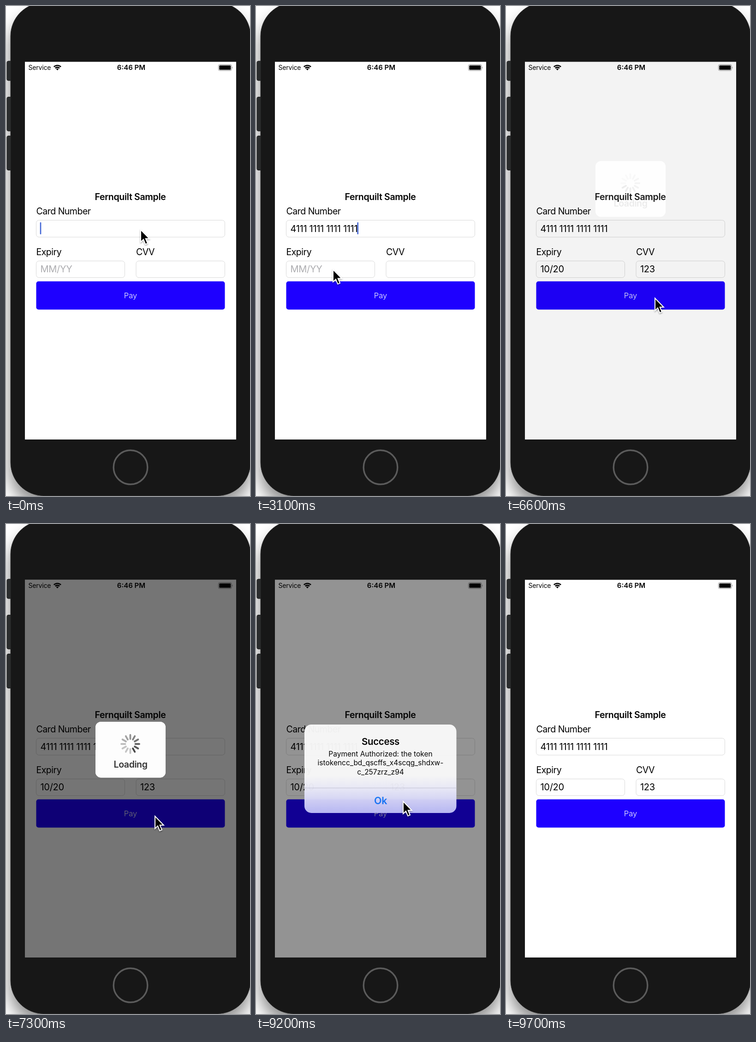
An HTML page that plays this animation: 529x1058 px, repeating every 10000 ms.

```html
<!DOCTYPE html>
<html lang="en">
<head>
<meta charset="utf-8">
<title>Card payment</title>
<style>
  html, body { margin: 0; width: 100%; height: 100%; overflow: hidden; background: #fff; }
  svg { display: block; width: 100%; height: 100%; }
  text { font-family: Inter, Roboto, sans-serif; white-space: pre; }
  .mid { text-anchor: middle; }
  .bold { font-weight: 600; }
  .label { font-size: 19.5px; letter-spacing: -.5px; }
  .value { font-size: 20px; letter-spacing: -.3px; }
  .note { font-size: 15.5px; }
  .field rect { fill: none; stroke: #d9d9d9; }
</style>
</head>
<body>
<svg viewBox="0 0 529 1058">
  <defs>
    <filter id="soft" x="-20%" y="-20%" width="140%" height="140%"><feGaussianBlur stdDeviation="17"/></filter>
    <filter id="drop" x="-50%" y="-50%" width="200%" height="200%"><feDropShadow dx="0" dy="2" stdDeviation="1.5" flood-opacity=".35"/></filter>
    <linearGradient id="glass" x1="0" y1="0" x2="0" y2="1">
      <stop offset=".58" stop-color="#f9f9f9"/>
      <stop offset=".74" stop-color="#e9e9f9"/>
      <stop offset=".88" stop-color="#d2d2f7"/>
      <stop offset="1" stop-color="#bebef6"/>
    </linearGradient>
  </defs>

  <rect x="8" y="18" width="522" height="1060" rx="72" opacity=".45" filter="url(#soft)"/>
  <g fill="#2b2d2e" stroke="#161616">
    <rect x="2" y="119" width="12" height="42" rx="3"/>
    <rect x="2" y="196.500" width="12" height="73.500" rx="3"/>
    <rect x="2" y="280.500" width="12" height="74" rx="3"/>
  </g>
  <rect x="10" y="-7" width="520" height="1064.500" rx="72" fill="#171717" stroke="#2c2c2c"/>
  <circle cx="270" cy="996" r="36.800" fill="none" stroke="#5b5b5b" stroke-width="3.400"/>
  <rect x="41" y="120.500" width="458" height="815.500" fill="#fff"/>

  <text x="48.500" y="138" font-size="14" letter-spacing="-.2">Service</text>
  <g fill="none" stroke="#000" stroke-width="2.700">
    <path d="M103.800 131.400a10.800 10.800 0 0 1 15.200 0M106.800 134.300a6.500 6.500 0 0 1 9.200 0"/>
    <path d="M111.400 139l-2.700-2.800a3.900 3.900 0 0 1 5.400 0z" fill="#000" stroke="none"/>
  </g>
  <text class="mid bold" x="271.500" y="138" font-size="15">6:46 PM</text>
  <rect x="460.500" y="126.500" width="28.500" height="13" rx="3" fill="none" stroke="#8a8a8a"/>
  <rect x="462.300" y="128.300" width="25" height="9.400" rx="1.500"/>
  <path d="M490.500 131q2 2 0 4z" fill="#8a8a8a"/>

  <text class="mid bold" x="269.500" y="418.500" font-size="19.500" letter-spacing="-.3">Fernquilt Sample</text>
  <g class="label">
    <text x="65.500" y="450">Card Number</text>
    <text x="65.500" y="537.500">Expiry</text>
    <text x="282" y="537.500">CVV</text>
  </g>
  <g class="field">
    <rect x="65.500" y="462.500" width="409" height="36.500" rx="6"/>
    <rect x="65.500" y="550.500" width="192" height="36" rx="6"/>
    <rect x="282" y="550.500" width="192.500" height="36" rx="6"/>
  </g>
  <g class="value">
    <text id="hint" x="74.500" y="575" fill="#adadb0">MM/YY</text>
    <text id="card" x="74.500" y="487.500"></text>
    <text id="expiry" x="74.500" y="575"></text>
    <text id="cvv" x="291" y="575"></text>
  </g>
  <rect id="caret" width="2.600" height="26" rx="1" fill="#4467d6"/>
  <rect x="65.500" y="594.500" width="409" height="61" rx="5" fill="#1e00ff"/>
  <text id="pay" class="mid" x="270" y="630.500" font-size="16.500" font-weight="300" fill="#fff">Pay</text>

  <path id="hudDim" fill-rule="evenodd"/>
  <g id="hud">
    <rect x="194" y="427" width="152" height="120.500" rx="12" fill="#fdfdfd"/>
    <g id="spinner" transform="translate(269.500 475)" stroke="#333" stroke-width="3.800" stroke-linecap="round"></g>
    <text class="mid bold" x="270" y="525.500" font-size="19.500" letter-spacing="-.4" fill="#333">Loading</text>
  </g>

  <rect id="alertDim" x="41" y="120.500" width="458" height="815.500"/>
  <g id="alert">
    <rect x="105" y="433" width="329.500" height="191" rx="15" fill="url(#glass)"/>
    <path d="M105 570H434.500" stroke="#c3c3d6"/>
    <text class="mid bold" x="270" y="476.500" font-size="20.500" letter-spacing="-.35">Success</text>
    <text class="mid note" x="270" y="501.500">Payment Authorized: the token</text>
    <text class="mid note" x="270" y="521">istokencc_bd_qscffs_x4scqg_shdxw-</text>
    <text class="mid note" x="270" y="540.500">c_257zrz_z94</text>
    <text class="mid bold" x="270" y="604.500" font-size="21.500" letter-spacing="-.3" fill="#1a78f7">Ok</text>
  </g>

  <path id="pointer" d="M0 0V26.500L6 21L10.300 31.300L15 29.300L10.700 19.300H18.800Z" stroke="#fff" stroke-width="2" filter="url(#drop)"/>
</svg>
<script>
const LOOP = 10000, STEP = 100;
const CARD = '4111 1111 1111 1111';
const ids = ['hint', 'card', 'expiry', 'cvv', 'caret', 'pay', 'hudDim', 'hud', 'spinner', 'alertDim', 'alert', 'pointer'];
const el = Object.fromEntries(ids.map(id => [id, document.getElementById(id)]));

const spokes = Array.from({ length: 12 }, (_, i) => {
  const line = document.createElementNS('http://www.w3.org/2000/svg', 'line');
  line.setAttribute('y1', -11);
  line.setAttribute('y2', -19.5);
  line.setAttribute('transform', `rotate(${i * 30})`);
  return el.spinner.appendChild(line);
});

const set = (node, name, value) => node.setAttribute(name, value);
const part = (t, from, to) => Math.min(1, Math.max(0, (t - from) / (to - from)));
const easeOut = x => 1 - (1 - x) ** 3;
const easeBoth = x => x * x * (3 - 2 * x);

// Pointer moves: start, end, target
const moves = [
  [2900, 3100, 167, 569],
  [4500, 4800, 366, 564],
  [5300, 6000, 323, 631],
  [8300, 8700, 319, 599],
];

function pointerAt(t) {
  let x = 292, y = 483;
  for (const [from, to, tx, ty] of moves) {
    const k = easeBoth(part(t, from, to));
    x += (tx - x) * k;
    y += (ty - y) * k;
  }
  return [x, y];
}

function cardText(t) {
  if (t < 500) return '';
  let digits = 1;
  if (t >= 1500) digits += Math.round(13 * part(t, 1400, 2500));
  digits += 2 * part(t, 2500, 2700);
  return CARD.slice(0, digits + Math.floor((digits - 1) / 4));
}

function expiryText(t) {
  if (t < 3500) return '';
  if (t < 4000) return '1';
  return t < 4100 ? '10/' : t < 4200 ? '10/2' : '10/20';
}

function caretAlpha(t) {
  if (t < 500) return 1 - part(t, 0, 300);
  if (t < 1500) return 1 - part(t, 900, 1100);
  if (t >= 4600 && t < 4900) return 0;
  return t < 6200 ? 1 : 0;
}

function drawFields(t) {
  el.card.textContent = cardText(t);
  el.expiry.textContent = expiryText(t);
  el.cvv.textContent = '123'.slice(0, Math.max(0, Math.floor((t - 4900) / 100)));
  set(el.hint, 'opacity', t < 3500 ? 1 : 0);
  set(el.pay, 'opacity', t >= 6200 && t < 6300 ? .4 : 1);

  const field = t < 3300 ? el.card : t < 4800 ? el.expiry : el.cvv;
  const width = field.textContent ? field.getComputedTextLength() : 0;
  set(el.caret, 'x', +field.getAttribute('x') + width - .8);
  set(el.caret, 'y', field.getAttribute('y') - 20.5);
  set(el.caret, 'opacity', caretAlpha(t));
}

function drawHud(t) {
  const enter = easeOut(part(t, 6590, 7100));
  const shown = t < 6600 ? 0 : 1 - part(t, 7700, 8160);
  const dy = -98 * (1 - enter);
  set(el.hud, 'transform', `translate(0 ${dy})`);
  set(el.hud, 'opacity', shown * (.04 + .96 * enter));
  // The dimming leaves the panel area clear
  set(el.hudDim, 'd', `M41 120.5H499V936H41ZM206 ${427 + dy}h128a12 12 0 0 1 12 12v96.500a12 12 0 0 1-12 12h-128a12 12 0 0 1-12-12v-96.500a12 12 0 0 1 12-12z`);
  set(el.hudDim, 'opacity', shown * .54 * Math.min(1, enter * .97 + .03));
  const lead = Math.floor((t - 7300) / (1000 / 12)) + 5;
  spokes.forEach((s, i) => {
    const age = (((lead - i) % 12) + 12) % 12;
    set(s, 'opacity', Math.max(.28, .9 - age * .075));
  });
}

function drawAlert(t) {
  const enter = easeOut(part(t, 7700, 8100));
  const alpha = enter * (1 - part(t, 9100, 9600) ** 2);
  set(el.alertDim, 'opacity', .44 * alpha);
  set(el.alert, 'opacity', alpha);
  set(el.alert, 'transform', `translate(269.75 528.5) scale(${1.2 - .2 * enter}) translate(-269.75 -528.5)`);
}

function draw(ms) {
  const t = Math.floor((ms % LOOP) / STEP) * STEP;
  drawFields(t);
  drawHud(t);
  drawAlert(t);
  set(el.pointer, 'transform', `translate(${pointerAt(t)})`);
  set(el.pointer, 'opacity', t < 9700 ? 1 : 0);
}

const start = performance.now();
function tick() {
  draw(performance.now() - start);
  requestAnimationFrame(tick);
}
tick();
</script>
</body>
</html>
```
